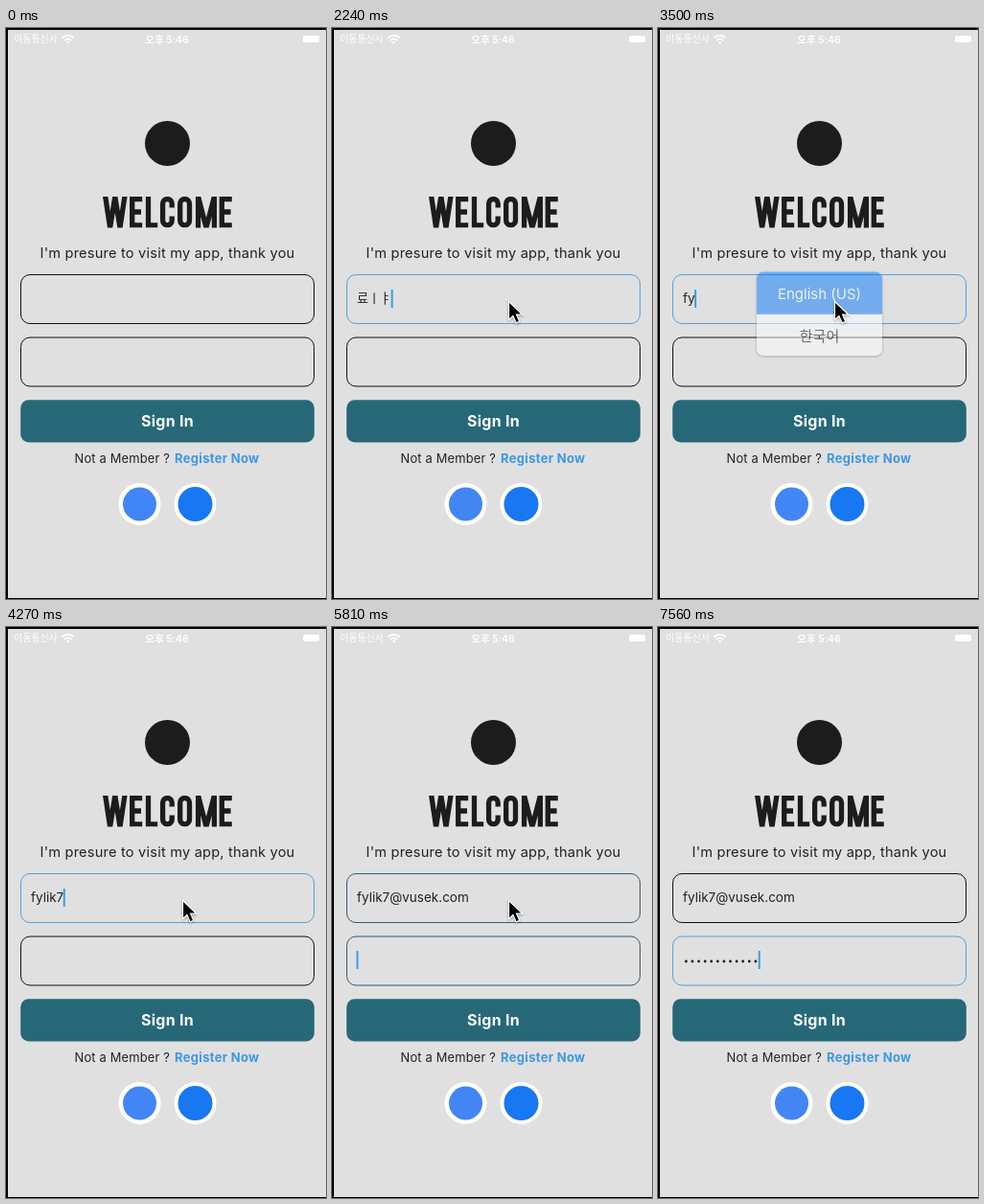
An HTML page that plays this animation: 334 by 596 pixels, repeating every 8 s.

```html
<!DOCTYPE html>
<html lang="ko">
<head>
<meta charset="utf-8">
<title>Sign in</title>
<style>
  html, body { margin: 0; width: 100%; height: 100%; overflow: hidden; background: #e0e0e0; }
  svg { display: block; width: 334px; height: 596px; }
  text { font-family: Inter, "Noto Sans CJK KR", "Noto Sans CJK", sans-serif; fill: #222; white-space: pre; }
  .mid { text-anchor: middle; }
  .white { fill: #fff; }
  .field { fill: none; stroke-width: 1; }
  #user { font-size: 13.5px; }
  #user.ko { font-size: 13.1px; }
  #popup { filter: drop-shadow(0 1px 1.5px #0007); }
  #mouse { filter: drop-shadow(0 1px 1px #0005); }
</style>
</head>
<body>
<svg viewBox="0 0 334 596">
  <rect width="334" height="596"/>
  <rect x="2" y="2" width="332" height="593" fill="#e0e0e0"/>

  <!-- status bar -->
  <text class="white" x="8" y="15" font-size="10">이동통신사</text>
  <g fill="none" stroke="#fff" stroke-width="1.9">
    <path d="M58.4 10.4a8.6 8.6 0 0 1 12.2 0M60.9 13a5.1 5.1 0 0 1 7.2 0"/>
    <path d="M64.5 16.8l-1.8-2a2.6 2.6 0 0 1 3.6 0z" fill="#fff" stroke="none"/>
  </g>
  <text class="white mid" x="168" y="15.5" font-size="10.5" font-weight="600">오후 5:46</text>
  <rect x="310" y="8" width="17" height="7" rx="1.8" fill="#fff"/>

  <circle cx="168.5" cy="120.5" r="23.5" fill="#1c1c1c"/>

  <!-- condensed lettering: centre lines, cut flat at cap height and baseline -->
  <clipPath id="caps"><rect x="95" y="176" width="150" height="32.4"/></clipPath>
  <g role="img" aria-label="WELCOME" clip-path="url(#caps)"
     fill="none" stroke="#1c1c1c" stroke-width="5.3" stroke-miterlimit="20">
    <path d="M103.1 172L108.6 208.4 113.8 176 119 208.4 124.5 172"/>
    <path id="e" d="M142.2 178.6H131.7V205.8H142.2M131.7 192H141"/>
    <path d="M148.5 176V205.8H158.2"/>
    <path d="M173.2 187.5v-4.2a4.8 4.8 0 0 0-9.6 0v17.8a4.8 4.8 0 0 0 9.6 0v-4.6"/>
    <rect x="181.7" y="178.5" width="9.8" height="27.4" rx="4.8"/>
    <path d="M200.6 212V176L209 208.4 217.4 176V212"/>
    <use href="#e" x="93.6"/>
  </g>
  <text class="mid" x="168.5" y="240" font-size="14.6" letter-spacing=".2">I'm presure to visit my app, thank you</text>

  <rect class="field" x="15.5" y="257.5" width="306" height="51" rx="9.5"/>
  <rect class="field" x="15.5" y="323" width="306" height="51" rx="9.5"/>
  <text id="user" x="26" y="287"></text>
  <g id="dots" fill="#1c1c1c"></g>
  <rect id="caret" width="2" height="19" fill="#3f9de0"/>

  <rect x="15.2" y="388.2" width="306.6" height="44.2" rx="8.5" fill="#266878"/>
  <text class="white mid" x="168.5" y="416" font-size="16" font-weight="700" letter-spacing=".3">Sign In</text>
  <text x="71.5" y="454" font-size="12.9" letter-spacing=".18">Not a Member ?</text>
  <text x="176" y="454" font-size="13" font-weight="700" letter-spacing=".32" style="fill:#3d97e8">Register Now</text>

  <circle cx="139.5" cy="497" r="22" fill="#fff"/>
  <circle cx="139.5" cy="497" r="17.5" fill="#4285f4"/>
  <circle cx="197.5" cy="497" r="22" fill="#fff"/>
  <circle cx="197.5" cy="497" r="18" fill="#1877f2"/>

  <g id="popup">
    <rect x="103" y="254.5" width="131" height="87.5" rx="7" fill="#fff"/>
    <path d="M103 298.8v-37.3a7 7 0 0 1 7-7h117a7 7 0 0 1 7 7v37.3z" fill="#067aff"/>
    <text class="white mid" x="168.5" y="283" font-size="15">English (US)</text>
    <text class="mid" x="168.5" y="327" font-size="15" style="fill:#000">한국어</text>
  </g>

  <path id="mouse" transform="translate(184.5 285.5)" stroke="#fff" stroke-width="1.2"
        d="M0 0v19.2l4.4-4.2 3.3 7.4 3.6-1.5-3.2-7.2h6.3z"/>
</svg>
<script>
const LOOP = 8000;
const TICK = 70; // the picture changes on this beat
const LEFT = 26;
const DOT_GAP = 6.6;
const MAX_DOTS = 12;
const EMAIL = "fylik7@vusek.com";
const HANGUL = ["", "ㄹ", "료", "료ㅣㅑ", "료ㅣㅑㅏ"];

const $ = id => document.getElementById(id);
const [user, dots, caret, popup, mouse] = ["user", "dots", "caret", "popup", "mouse"].map($);
const fields = document.querySelectorAll(".field");

for (let i = 0; i < MAX_DOTS; i++) {
  const dot = document.createElementNS("http://www.w3.org/2000/svg", "circle");
  dot.setAttribute("cx", LEFT + DOT_GAP * (i + .5));
  dot.setAttribute("cy", 349);
  dot.setAttribute("r", 1.4);
  dots.append(dot);
}

const clamp = (v, max) => Math.min(Math.max(v, 0), max);
const ramp = (t, from, to) => clamp((t - from) / (to - from), 1);

// Keys pressed by time t when n keys are spread evenly between two moments.
const keys = (t, from, to, n) => clamp(Math.floor((t - from) / (to - from) * (n - 1)) + 1, n);

function userText(t) {
  const latin = keys(t, 3290, 4270, 6) + keys(t, 4620, 5600, 10);
  if (latin) return EMAIL.slice(0, latin);
  const typed = HANGUL[keys(t, 1540, 1960, 4)];
  const deleted = (t >= 2240) + keys(t, 2660, 2870, 3);
  return typed.slice(0, Math.max(typed.length - deleted, 0));
}

function caretOpacity(t) {
  if (t < 560) return 0;
  return t < 1540 ? 1 - ramp(t, 1120, 1330) : 1;
}

function draw(time) {
  const t = (Math.floor(time / TICK) + 1) * TICK - 1;
  const text = userText(t);
  const dotCount = keys(t, 6230, 6790, 7) + keys(t, 6930, 7560, 5);
  const moved = ramp(t, 5810, 5950);
  const focus = [ramp(t, 560, 840) - moved, moved];

  user.textContent = text;
  user.classList.toggle("ko", /[ㄱ-힣]/.test(text));
  [...dots.children].forEach((dot, i) => dot.style.opacity = i < dotCount ? 1 : 0);
  fields.forEach((field, i) =>
    field.style.stroke = `color-mix(in srgb, #55a2dc ${focus[i] * 100}%, #111)`);

  const width = moved ? dotCount * DOT_GAP : text ? user.getComputedTextLength() : 0;
  caret.setAttribute("x", LEFT + width - .5);
  caret.setAttribute("y", moved ? 338 : 273);
  caret.style.opacity = caretOpacity(t);

  popup.style.opacity = ramp(t, 3010, 3150) - ramp(t, 3430, 3710);
  mouse.style.opacity = t >= 1120 && t < 7210 ? 1 : 0;
}

const start = performance.now();
function tick() {
  draw((performance.now() - start) % LOOP);
  requestAnimationFrame(tick);
}
tick();
</script>
</body>
</html>
```
